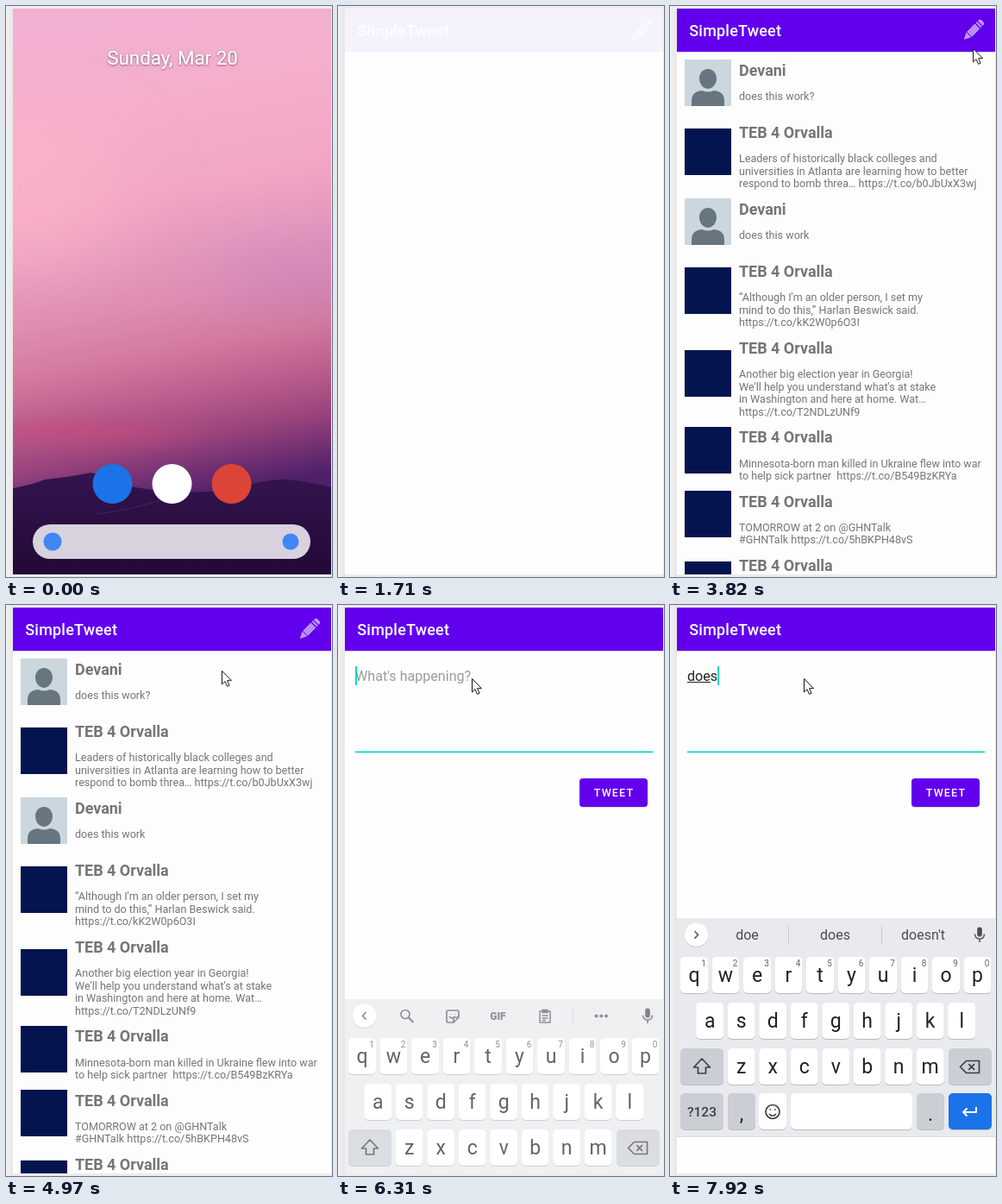
Animation, 378 px wide and 662 px high, one loop 8000 ms. Source, as an HTML page:

```html
<!DOCTYPE html>
<html lang="en">
<head>
<meta charset="utf-8">
<title>SimpleTweet demo</title>
<style>
html, body { margin: 0; width: 100%; height: 100%; overflow: hidden; background: #ececec; }
svg { display: block; width: 378px; height: 662px; font-family: Roboto, "Open Sans", sans-serif; }
text { white-space: pre; }
.zoom { transform-origin: 192.5px 331px; }
.title { font-size: 17.96px; font-weight: 500; letter-spacing: .0125em; fill: #fff; }
.name { font-size: 17.96px; font-weight: 700; fill: #757575; }
.body { font-size: 12.57px; fill: #757575; }
.field { font-size: 16.1px; fill: #212121; }
.key { font-size: 23px; fill: #202124; text-anchor: middle; }
.digit { font-size: 10px; fill: #5f6368; text-anchor: middle; }
.word { font-size: 16px; fill: #4a4d51; text-anchor: middle; }
.line { fill: none; stroke: #5f6368; stroke-width: 1.7; stroke-linejoin: round; }
.tap { fill: rgba(255,255,255,.5); stroke: rgba(0,0,0,.6); }
</style>
</head>
<body>
<svg viewBox="0 0 378 662">
  <defs>
    <clipPath id="screen"><rect x="8" y="3" width="369" height="656"/></clipPath>
    <linearGradient id="edge"><stop stop-color="#f2f2f2"/><stop offset="1" stop-color="#e7e7e7"/></linearGradient>
    <linearGradient id="sky" gradientUnits="userSpaceOnUse" x1="137" y1="3" x2="247" y2="565">
      <stop stop-color="#f2b0d3"/><stop offset=".2" stop-color="#f4aecb"/>
      <stop offset=".38" stop-color="#f2a5c4"/><stop offset=".5" stop-color="#e699bd"/>
      <stop offset=".6" stop-color="#df8db3"/><stop offset=".7" stop-color="#d3799f"/>
      <stop offset=".8" stop-color="#b85c8b"/><stop offset=".88" stop-color="#9a447c"/>
      <stop offset=".96" stop-color="#682b70"/><stop offset="1" stop-color="#4f2068"/>
    </linearGradient>
    <linearGradient id="hill" x2="0" y2="1"><stop stop-color="#34144f"/><stop offset="1" stop-color="#220936"/></linearGradient>
    <filter id="haze" x="-100%" y="-150%" width="300%" height="400%"><feGaussianBlur stdDeviation="45 32"/></filter>
    <filter id="streak" x="-50%" y="-150%" width="200%" height="400%"><feGaussianBlur stdDeviation="30 9"/></filter>
    <filter id="shade"><feDropShadow dx="0" dy=".8" stdDeviation=".9" flood-color="#503048" flood-opacity=".8"/></filter>
  </defs>
  <rect width="8" height="662" fill="url(#edge)"/>
  <g clip-path="url(#screen)">
    <g id="home">
      <rect x="8" y="3" width="369" height="656" fill="url(#sky)"/>
      <ellipse cx="25" cy="215" rx="110" ry="100" fill="#ffb6c8" opacity=".5" filter="url(#haze)"/>
      <ellipse cx="345" cy="310" rx="100" ry="35" fill="#b57fc0" opacity=".4" filter="url(#haze)"/>
      <ellipse cx="85" cy="494" rx="120" ry="14" fill="#c8487c" opacity=".55" filter="url(#streak)"/>
      <path d="M8 559 Q30 555 45 549 Q80 545 98 541 Q120 545 135 555 Q165 562 200 563 Q250 565 275 557 Q300 549 325 549 Q350 551 377 558 V659 H8Z" fill="url(#hill)"/>
      <path d="M105 589 Q150 583 178 573" fill="none" stroke="#432260" stroke-width="1"/>
      <text x="117.3" y="68.3" font-size="22.3" fill="#fff" filter="url(#shade)">Sunday, Mar 20</text>
      <circle cx="123.5" cy="554" r="23" fill="#1a73e8"/>
      <circle cx="192.5" cy="554" r="23" fill="#fff"/>
      <circle cx="261.5" cy="554" r="23" fill="#db4437"/>
      <rect x="31" y="601" width="322" height="40" rx="20" fill="#d7d2de"/>
      <circle cx="54" cy="621" r="10.5" fill="#4285f4"/>
      <circle cx="330" cy="621" r="9.5" fill="#4285f4"/>
    </g>

    <g id="app" class="zoom">
      <rect x="8" y="3" width="369" height="656" fill="#fdfdfd"/>
      <g id="feed"></g>
      <g id="bar">
        <rect x="8" y="53" width="369" height="1" fill="#6200ee" opacity=".2"/>
        <rect x="8" y="3" width="369" height="50" fill="#6200ee"/>
        <text class="title" x="22.3" y="35">SimpleTweet</text>
        <g transform="translate(340.8 39) rotate(-45) scale(.98 .88)" fill="#fff" opacity=".6">
          <path d="M0 0 L8 -4.6 V4.6Z M9 -4.6 H22.5 V4.6 H9Z M24 -4.6 H26 V4.6 H24Z M27.3 -4.6 H28.5 Q31 -4.6 31 -2 V2 Q31 4.6 28.5 4.6 H27.3Z"/>
          <path d="M9 -1.5 H22.5 M9 1.7 H22.5" stroke="#6200ee" stroke-width=".6" opacity=".5"/>
        </g>
      </g>
    </g>

    <g id="compose" class="zoom">
      <rect x="8" y="3" width="369" height="656" fill="#fefefe"/>
      <rect x="8" y="53" width="369" height="1" fill="#6200ee" opacity=".2"/>
      <rect x="8" y="3" width="369" height="50" fill="#6200ee"/>
      <text class="title" x="22.3" y="35">SimpleTweet</text>
      <text id="hint" class="field" x="20" y="88" style="fill:#9b9b9b">What's happening?</text>
      <g id="typed"></g>
      <rect id="rule" x="20.5" y="169.8" width="344" height="1" fill="#808080"/>
      <rect id="focus" x="20" y="169.5" width="345" height="1.8" fill="#03dac5"/>
      <rect id="caret" x="20" y="71" width="1.9" height="22" fill="#03dac5"/>
      <rect x="280" y="202" width="79" height="33" rx="4" fill="#000" opacity=".15"/>
      <rect x="280" y="201" width="79" height="33" rx="4" fill="#6200ee"/>
      <text x="296.8" y="222" font-size="12.57" font-weight="500" letter-spacing="1.12" fill="#fff">TWEET</text>
    </g>

    <g id="keyboard">
      <rect x="8" y="363" width="369" height="254" fill="#e8eaed"/>
      <rect x="8" y="616" width="369" height="1" fill="#d9dbde"/>
      <rect x="8" y="617" width="369" height="42" fill="#fefefe"/>
      <circle cx="30.5" cy="383" r="14" fill="#c8cacd"/>
      <circle cx="30.5" cy="382.3" r="13.8" fill="#fff"/>
      <g id="tools" class="line">
        <path d="M32.5 378 L28.5 382.3 L32.5 386.6"/>
        <circle cx="78" cy="380.5" r="5"/><path d="M81.7 384.2 L87.5 390" stroke-width="2.2"/>
        <path d="M128 376 H138 Q140 376 140 378 V384 L134 390 H128 Q126 390 126 388 V378 Q126 376 128 376Z M134 390 V384 H140 M129 383 Q132 387 135 383"/>
        <path d="M130.5 380 V380.6 M135.5 380 V380.6"/>
        <text x="185.5" y="387" font-size="12" font-weight="900" text-anchor="middle" fill="#5f6368" stroke="none">GIF</text>
        <path d="M234 377 H246 V390 H234Z M237 375.5 H243 V378.5 H237Z M236.5 382 H243.5 M236.5 385 H243.5 M236.5 387.6 H241" stroke-width="1.5"/>
        <path d="M272.5 372 V393" stroke="#d0d2d6" stroke-width="1"/>
        <g fill="#5f6368" stroke="none"><circle cx="299.5" cy="382.5" r="2"/><circle cx="305.3" cy="382.5" r="2"/><circle cx="311" cy="382.5" r="2"/></g>
      </g>
      <g id="words">
        <path class="line" d="M28.5 378 L32.5 382.3 L28.5 386.6"/>
        <path d="M137.5 372 V393 M245.5 372 V393" stroke="#c9ccd0"/>
      </g>
      <rect x="356.2" y="373.5" width="5.6" height="11" rx="2.8" fill="#4a4d51"/>
      <path class="line" d="M353.5 381.5 Q353.8 387 359 387 Q364.2 387 364.5 381.5 M359 387 V391"/>
      <g id="keys"></g>
      <g class="line" style="stroke:#3c4043">
        <path d="M37 526 L46.5 536 H41.5 V543 H32.5 V536 H27.5Z"/>
        <path d="M343.5 528.5 H358.5 V542.5 H343.5 L336.5 535.5Z M346.3 532.2 L353 538.9 M353 532.2 L346.3 538.9"/>
        <circle cx="119" cy="587.5" r="8"/>
        <path d="M115 590 Q119 594.5 123 590 M116.3 584.3 V585.8 M121.7 584.3 V585.8"/>
        <path d="M355 582 V588 H340 M344.5 583.5 L340 588 L344.5 592.5" style="stroke:#fff" stroke-width="2"/>
      </g>
    </g>

    <circle id="tap1" class="tap" cx="356" cy="22" r="14.3"/>
    <circle id="tap2" class="tap" cx="155" cy="85" r="14.3"/>
    <path id="pointer" d="M.5 .5 V16 L4 12.7 L6.4 18.4 L9 17.3 L6.6 11.7 H11.4Z" fill="#fff" stroke="#111" stroke-width="1"/>
  </g>
</svg>
<script>
const LOOP = 8000;
const SVG = 'http://www.w3.org/2000/svg';
const $ = id => document.getElementById(id);

function add(parent, tag, attrs, text) {
  const el = document.createElementNS(SVG, tag);
  for (const k in attrs) el.setAttribute(k, attrs[k]);
  if (text) el.textContent = text;
  parent.append(el);
  return el;
}
const label = (parent, cls, x, y, text) => add(parent, 'text', { class: cls, x, y }, text);

// Timeline helpers: rows are [ms, styles, easing]
const t0 = document.timeline.currentTime || 0;
function play(el, rows, ease = 'linear') {
  const first = rows[0], last = rows[rows.length - 1];
  const all = [[0, first[1]], ...rows, [LOOP, last[1]]];
  const frames = all.map(([ms, css, e]) => ({ offset: ms / LOOP, easing: e || ease, ...css }));
  el.animate(frames, { duration: LOOP, iterations: Infinity }).startTime = t0;
}
function show(el, ...times) {
  const rows = times.map((ms, i) => [ms, { opacity: i % 2 ? 0 : 1 }]);
  play(el, [[0, { opacity: 0 }], ...rows], 'step-end');
}
function openWindow(el, at) {
  play(el, [[at + 35, { opacity: 0 }], [at + 85, { opacity: 1 }]]);
  play(el, [
    [at, { transform: 'scale(.85)' }, 'cubic-bezier(.3,0,.8,.15)'],
    [at + 67, { transform: 'scale(.91)' }, 'cubic-bezier(.05,.7,.1,1)'],
    [at + 400, { transform: 'scale(1)' }]
  ]);
}

// Feed: image top, then lines of text
const USER = 'Devani', NEWS = 'TEB 4 Orvalla';
const LEADING = 14.73;
const posts = [
  [USER, 62, 'does this work?'],
  [NEWS, 142, 'Leaders of historically black colleges and', 'universities in Atlanta are learning how to better', 'respond to bomb threa… https://t.co/b0JbUxX3wj'],
  [USER, 223, 'does this work'],
  [NEWS, 303, "“Although I'm an older person, I set my", 'mind to do this,” Harlan Beswick said.', 'https://t.co/kK2W0p6O3I'],
  [NEWS, 399, 'Another big election year in Georgia!', "We'll help you understand what's at stake", 'in Washington and here at home. Wat…', 'https://t.co/T2NDLzUNf9'],
  [NEWS, 488, 'Minnesota-born man killed in Ukraine flew into war', 'to help sick partner  https://t.co/B549BzKRYa'],
  [NEWS, 562, 'TOMORROW at 2 on @GHNTalk', '#GHNTalk https://t.co/5hBKPH48vS'],
  [NEWS, 644]
];
const images = add($('feed'), 'g', {});
const copy = add($('feed'), 'g', {});
let base = 81;
for (const [name, top, ...lines] of posts) {
  const user = name === USER;
  add(images, 'rect', { x: 17, y: top, width: 54, height: 54, fill: user ? '#ccd6dd' : '#04144f' });
  if (user) add(images, 'path', {
    transform: `translate(17 ${top})`, fill: '#66757f',
    d: 'M27 11 C33 11 37 16 37 22 C37 29 32 34 27 34 C22 34 17 29 17 22 C17 16 21 11 27 11Z M8 54 V48 Q8 37 20 36 Q27 39 34 36 Q46 37 46 48 V54Z'
  });
  label(copy, 'name', 80, base, name);
  lines.forEach((s, i) => label(copy, 'body', 80, base + 28.2 + i * LEADING, s));
  base += Math.max(71.8, 44.8 + lines.length * LEADING);
}

// Keys
function key(x, y, w, fill = '#fff') {
  add($('keys'), 'rect', { x, y: y + 1, width: w, height: 42, rx: 5, fill: '#b9bcc2' });
  add($('keys'), 'rect', { x, y, width: w, height: 42, rx: 5, fill });
}
const GREY = '#cbced5';
[['qwertyuiop', 28, 408], ['asdfghjkl', 46.2, 461], ['zxcvbnm', 82.7, 514]].forEach(([row, x0, y], r) =>
  [...row].forEach((ch, i) => {
    const x = x0 + i * 36.5;
    key(x - 16, y, 32);
    label($('keys'), 'key', x, y + 28.5, ch);
    if (!r) label($('keys'), 'digit', x + 11, y + 11, (i + 1) % 10 + '');
  }));
[[12, 514, 50, GREY], [323, 514, 50, GREY], [12, 566, 50, GREY], [67, 566, 32, GREY], [103, 566, 32],
 [140, 566, 141], [286, 566, 32, GREY], [323, 566, 50, '#1a73e8']].forEach(k => key(...k));
label($('keys'), 'key', 37, 593, '?123').style.cssText = 'font-size:15.5px;font-weight:500;fill:#3c4043';
label($('keys'), 'key', 83, 598, ',');
label($('keys'), 'key', 302, 598, '.');

// Typing: text, start, end, underline width
const typing = [['d', 7310, 7510, 9], ['do', 7510, 7850, 18], ['doe', 7850, 7920, 27], ['does', 7920, LOOP, 27]];
for (const [s, from, to, w] of typing) {
  const g = add($('typed'), 'g', {});
  label(g, 'field', 20, 88, s);
  add(g, 'rect', { x: 20, y: 89, width: w, height: 1, fill: '#212121' });
  show(g, from, to);
}
for (const [from, to, ...set] of [[7580, 7850, 'do', 'does', "don't"], [7850, LOOP, 'doe', 'does', "doesn't"]]) {
  const g = add($('words'), 'g', {});
  set.forEach((s, i) => label(g, 'word', 89.5 + i * 102, 388, s));
  show(g, from, to);
}

// Scenes
openWindow($('app'), 577);
play($('bar'), [[1680, { opacity: 0 }], [2120, { opacity: .57 }], [2200, { opacity: 1 }]]);
show(copy, 2790);
show(images, 2860);
openWindow($('compose'), 4990);

show($('rule'), 0, 5910);
show($('focus'), 5910);
show($('hint'), 0, 7310);
show($('caret'), 6110, 6650, 7110);
play($('caret'), [[0, 0], [7310, 9.1], [7510, 18.3], [7850, 26.8], [7920, 35.1]]
  .map(([ms, x]) => [ms, { transform: `translateX(${x}px)` }]), 'step-end');

show($('tools'), 0, 7580);
show($('words'), 7580);
const slide = (y, opacity) => ({ transform: `translateY(${y}px)`, opacity });
play($('keyboard'), [
  [0, slide(94, 0), 'step-end'], [6305, slide(94, .7)], [6320, slide(94, .7), 'ease-out'], [6440, slide(0, 1)]
]);

// Pointer and taps
show($('tap1'), 4360, 4510);
show($('tap2'), 5910, 6170);
show($('pointer'), 3130);
play($('pointer'), [
  [3130, 21, 88], [3410, 297, 111], [3660, 297, 111], [3820, 351, 49], [4160, 357, 22],
  [4490, 357, 22], [5240, 190, 106], [5340, 190, 106], [5650, 155, 85]
].map(([ms, x, y]) => [ms, { transform: `translate(${x}px, ${y}px)` }]));
</script>
</body>
</html>
```
